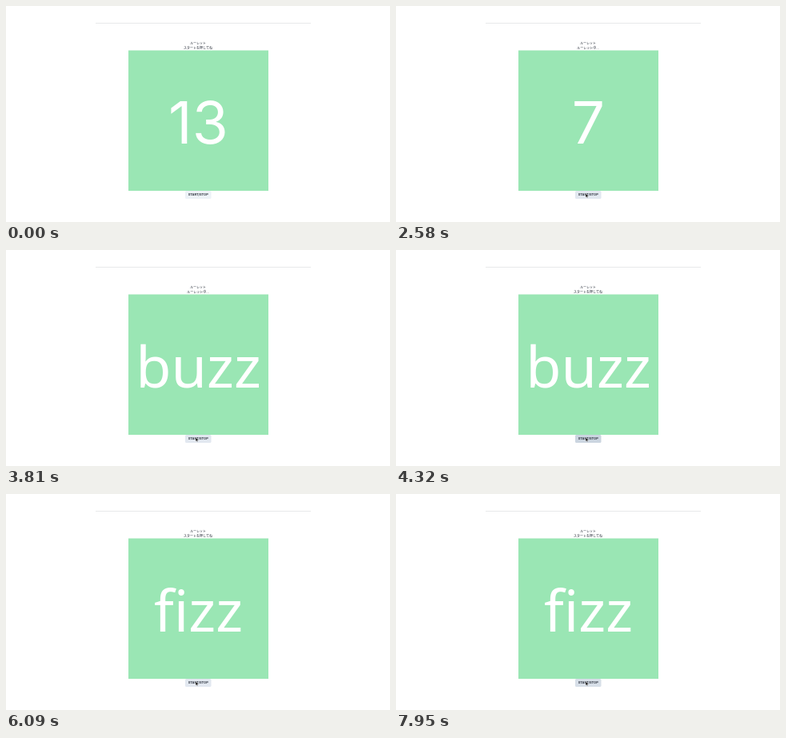
An HTML page that plays this animation: 480 by 270 pixels, repeating every 8 s.

```html
<!DOCTYPE html>
<html lang="ja">
<head>
<meta charset="utf-8">
<title>ルーレット</title>
<style>
  html, body { margin: 0; width: 100%; height: 100%; overflow: hidden; background: #fff; }
  svg { display: block; width: 480px; height: 270px; }
  text { text-anchor: middle; fill: #1a202c; }
  .label { font: 4px "Noto Sans CJK JP", "Noto Sans CJK", sans-serif; }
  .start { font: 600 4px Inter, sans-serif; }
  #value { fill: #fff; }
  .word { font: 72px "Noto Sans", sans-serif; }
  .number { font: 73px Inter, sans-serif; }
</style>
</head>
<body>
<svg viewBox="0 0 480 270">
  <rect x="112" y="21" width="269" height="1" fill="#e8e9ea"/>
  <text class="label" x="240" y="48">ルーレット</text>
  <text class="label" id="status" x="240" y="54"></text>
  <rect x="153" y="55.5" width="175" height="175.5" fill="#9ae6b4"/>
  <text id="value" x="240.5" y="172"></text>
  <rect id="button" x="224" y="231" width="32.5" height="10" rx="1.5"/>
  <text class="start" x="240.2" y="237.4">START/STOP</text>
  <path id="cursor" d="M0 0V5L1.2 4L2 5.8L2.9 5.4L2.1 3.7H3.7Z"
        fill="#111" stroke="#fff" stroke-width=".4"/>
</svg>
<script>
const LOOP = 8000, FRAME = 30, TICK = 88;
const REST = [237, 242, 247], HOVER = [226, 232, 240], ACTIVE = [203, 213, 224];

// Each spin: button press, first tick, second press, stop, last count
const SPINS = [
  { press: 1830, first: 1964, halt: 2680, stop: 2730, last: 8 },
  { press: 3240, first: 3370, halt: 4270, stop: 4320, last: 10 },
  { press: 5010, first: 5132, halt: 5950, stop: 6000, last: 9 },
  { press: 6990, first: 7124, halt: 7850, stop: 7930, last: 9 }
];
const MOVE = { from: 1020, to: 1710, x: [114, 237], y: [207, 234.2] };

const el = id => document.getElementById(id);
const clamp = v => Math.min(1, Math.max(0, v));
const mix = (a, b, k) => a + (b - a) * k;
const blend = (a, b, k) => a.map((v, i) => mix(v, b[i], k));
const smooth = k => k * k * (3 - 2 * k);
const fizzbuzz = n => (n % 3 ? "" : "fizz") + (n % 5 ? "" : "buzz") || String(n);

// Strength of the pressed shade: quick rise, short hold, quick fade
const pressed = (t, at) => Math.min(clamp((t - at + 30) / 60), clamp((at + 130 - t) / 60));

function spinState(t) {
  let n = 13, running = false;
  for (const s of SPINS) {
    if (t >= s.first) n = Math.min(s.last, Math.floor((t - s.first) / TICK));
    if (t >= s.press + 60) running = t < s.stop;
  }
  return { n, running };
}

function setText(node, text) {
  if (node.textContent !== text) node.textContent = text;
}

function draw(time) {
  const t = Math.floor(time % LOOP / FRAME) * FRAME;
  const { n, running } = spinState(t);
  const value = fizzbuzz(n);
  setText(el("value"), value);
  el("value").setAttribute("class", isNaN(value) ? "word" : "number");
  setText(el("status"), running ? "ルーレット中..." : "スタートを押してね");

  const k = smooth(clamp((t - MOVE.from) / (MOVE.to - MOVE.from)));
  const x = mix(...MOVE.x, k), y = mix(...MOVE.y, k);
  el("cursor").setAttribute("transform", `translate(${x} ${y})`);
  el("cursor").setAttribute("visibility", t < MOVE.from ? "hidden" : "visible");

  const push = Math.max(...SPINS.flatMap(s => [pressed(t, s.press), pressed(t, s.halt)]));
  const hover = blend(REST, HOVER, clamp((t - 1620) / 150));
  el("button").setAttribute("fill", `rgb(${blend(hover, ACTIVE, push).map(Math.round)})`);
}

function loop() {
  draw(performance.now());
  requestAnimationFrame(loop);
}
loop();
</script>
</body>
</html>
```
